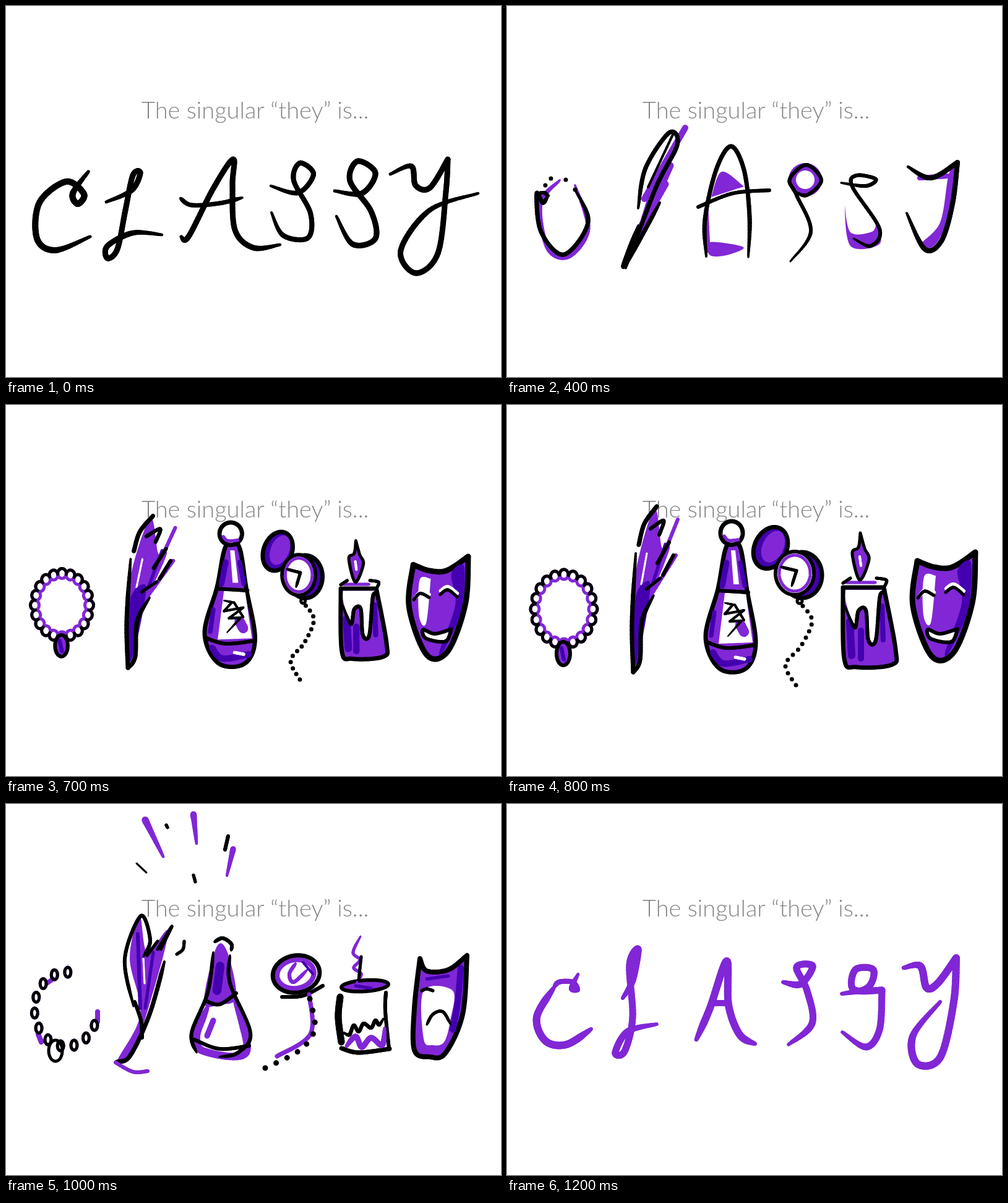
Write an HTML page with a canvas that moves like this. It is 800 px wide and 600 px high and loops after 1300 ms.

```html
<!DOCTYPE html>
<html lang="en">
<head>
<meta charset="utf-8">
<title>Classy</title>
<style>
html, body { margin: 0; width: 100%; height: 100%; overflow: hidden; background: #fff; }
svg, canvas { position: absolute; left: 0; top: 0; width: 800px; height: 600px; }
text { font: 300 38px Lato, "Open Sans", sans-serif; fill: #858585; }
</style>
</head>
<body>
<svg viewBox="0 0 800 600"><text x="219" y="182">The singular “they” is...</text></svg>
<canvas width="800" height="600"></canvas>
<script>
const STEP = 100, COUNT = 13;
const COLORS = { k: '#000', p: '#8127d6', d: '#4400b0', w: '#fff' };
const ctx = document.querySelector('canvas').getContext('2d');
ctx.lineCap = ctx.lineJoin = 'round';

const lerp = (a, b, t) => a + (b - a) * t;

// A bar doubles the point before it, which makes a corner.
function points(text) {
  const out = [];
  text.split('|').forEach((chunk, i) => {
    if (i) out.push(out[out.length - 1]);
    const n = chunk.split(' ').filter(Boolean).map(Number);
    for (let j = 0; j < n.length; j += 2) out.push([n[j], n[j + 1]]);
  });
  return out;
}

// Catmull-Rom curve
function smooth(pts, closed) {
  const n = pts.length, out = [];
  const at = i => closed ? pts[(i + n) % n] : pts[Math.max(0, Math.min(n - 1, i))];
  for (let i = 0; i < (closed ? n : n - 1); i++) {
    const a = at(i - 1), b = at(i), c = at(i + 1), d = at(i + 2);
    if (b[0] === c[0] && b[1] === c[1]) continue;
    for (let j = 0; j < 14; j++) {
      const t = j / 14;
      out.push([0, 1].map(k => b[k] + .5 * t * (c[k] - a[k] +
        t * (2 * a[k] - 5 * b[k] + 4 * c[k] - d[k] + t * (3 * (b[k] - c[k]) + d[k] - a[k])))));
    }
  }
  out.push(closed ? out[0] : pts[n - 1]);
  return out;
}

function resample(pts, count) {
  const q = smooth(pts), len = [0];
  for (let i = 1; i < q.length; i++) {
    len.push(len[i - 1] + Math.hypot(q[i][0] - q[i - 1][0], q[i][1] - q[i - 1][1]));
  }
  let j = 1;
  return Array.from({ length: count }, (_, i) => {
    const d = len[len.length - 1] * i / (count - 1);
    while (j < q.length - 1 && len[j] < d) j++;
    const t = (d - len[j - 1]) / (len[j] - len[j - 1] || 1);
    return [lerp(q[j - 1][0], q[j][0], t), lerp(q[j - 1][1], q[j][1], t)];
  });
}

// Parts of a drawing
const line = (color, width, text, fade) => ({ kind: 'line', color, width, fade, pts: points(text) });
const pen = (width, text, fade) => line('k', width, text, fade);
const brush = (width, text, fade) => line('p', width, text, fade);
const outlined = (color, pts, border) => [
  { kind: 'fill', color, pts },
  ...(border ? [{ kind: 'loop', color: 'k', width: border, pts }] : [])
];
const area = (color, text, border) => outlined(color, points(text), border);
function round(x, y, rx, ry, deg = 0) {
  const r = deg * Math.PI / 180;
  return Array.from({ length: 16 }, (_, i) => {
    const a = i * Math.PI / 8, u = rx * Math.cos(a), v = ry * Math.sin(a);
    return [x + u * Math.cos(r) - v * Math.sin(r), y + u * Math.sin(r) + v * Math.cos(r)];
  });
}
const disc = (color, border, ...oval) => outlined(color, round(...oval), border);
const ring = (color, width, ...oval) => ({ kind: 'loop', color, width, pts: round(...oval) });
const dots = (color, width, text, count) => {
  const pts = points(text);
  return { kind: 'dots', color, width, pts: count ? resample(pts, count) : pts };
};
const beads = (x, y, rx, ry, count, size, span, from = 0, to = 2 * Math.PI) => ({
  kind: 'beads', size, span, center: [x, y],
  pts: Array.from({ length: count }, (_, i) => {
    const a = lerp(from, to, i / count);
    return [x + rx * Math.cos(a), y + ry * Math.sin(a)];
  })
});

const inkC = [pen(10, '133 268 108 303 116 320 126 304 97 284 54 318 50 376 80 395 136 373')];
const inkL = [pen(9, '162 317 203 298 217 270 205 274 193 330 180 393 164 408 164 388 205 367 252 370')];
const inkA = [
  pen(9, '283 373 295 373 335 295 367 248 366 290 370 362 400 391 443 386'),
  pen(7, '282 311 300 322 345 319 382 310')
];
const inkS = [pen(8, '428 291 472 302 497 272 475 254 465 282 492 335 488 375 448 371 429 334')];
const inkZ = [pen(9, '531 299 575 303 597 270 568 251 556 283 590 332 597 376 560 385 534 340')];
const inkY = [pen(9, '621 272 655 259 662 290 685 294 714 248 | 711 300 698 400 662 432 638 395 685 330 763 303')];

const thinC = [pen(9, '96 268 85 300 97 319 102 297 66 300 51 350 66 395 100 405 128 362')];
const thinL = [pen(8, '187 314 222 284 243 245 225 256 212 315 200 390 180 411 182 385 220 357 266 338')];
const thinA = [
  pen(8, '302 398 318 382 340 300 369 248 378 300 382 345 393 375'),
  pen(7, '313 308 325 315 365 303 411 304')
];
const thinS = [pen(8, '446 291 478 304 508 280 484 263 474 302 490 345 480 387 446 395')];
const thinZ = [pen(8, '535 287 575 292 598 270 568 260 560 305 594 358 583 391 545 388')];
const thinY = [pen(8, '622 270 655 268 668 299 690 288 720 250 | 721 310 707 395 667 407 655 375 680 331 715 307')];

const violetC = [
  brush(8, '115 275 104 298 114 300 106 288 84 288 75 298'),
  brush(12, '75 298 48 345 62 383 96 389 136 364')
];
const violetL = [brush(11, '187 314 203 285 212 235 198 260 203 345 190 400 175 402 195 368 242 356')];
const violetA = [brush(12, '306 381 328 330 355 254 358 325 376 373 401 388'), brush(10, '330 322 354 322')];
const violetS = [brush(11, '446 288 475 291 494 262 468 264 485 302 493 355 455 389')];
const violetZ = [brush(11, '541 307 583 297 592 268 563 268 560 300 606 301 | 602 365 580 393 542 369')];
const violetY = [brush(12, '641 265 668 262 678 297 696 290 726 249 | 722 320 700 410 663 420 656 375 700 320')];

const halfNecklace = [
  brush(7, '85 282 54 320 66 392 100 405 131 360 110 290'),
  pen(7, '66 307 58 318 48 304 55 365 92 402 131 350 110 297'),
  pen(6, '49 304 60 302 66 307'),
  dots('k', 7, '62 290 71 279 95 281 110 297')
];
const halfFeather = [
  brush(10, '288 197 222 312'), brush(11, '264 258 213 372'),
  brush(11, '256 288 208 372'), brush(10, '240 285 220 350'),
  pen(7, '212 327 224 262 262 205 275 225 240 295 192 424'),
  pen(4, '268 208 228 293'),
  pen(7, '247 318 205 395 188 420 212 355')
];
const halfBottle = [
  area('p', '347 268 383 292 | 330 309 |'), brush(7, '322 330 325 395'),
  area('p', '327 382 382 390 355 403 328 403'),
  pen(7, '322 405 320 345 338 265 362 227 383 265 392 340 390 406'),
  pen(6, '309 325 365 303 424 298')
];
const halfWatch = [
  ring('p', 12, 482, 281, 21, 21),
  pen(6, '462 298 484 306 508 282 484 257 457 280 468 306 491 365 458 413')
];
const halfCandle = [
  area('p', '546 322 555 366 590 365 598 350 602 385 555 388'),
  pen(6, '540 286 580 291 596 280 565 274 558 292 602 360 588 388 560 376')
];
const halfMask = [
  area('p', '727 262 712 345 690 388 668 386 700 350 714 272'),
  brush(8, '667 278 712 275'),
  pen(8, '648 260 685 278 728 253 | 720 320 702 380 675 393 646 335')
];

const roughNecklace = [brush(4, '60 300 90 271 127 305'), beads(89, 334, 41, 60, 14, [7, 9], 1.5)];
const roughFeather = [
  area('p', '203 370 210 320 268 208 252 258 270 256 212 365'),
  pen(7, '271 195 220 255 202 345 188 418 | 205 375 222 345'),
  pen(5, '262 222 240 290 218 318')
];
const roughBottle = [
  brush(9, '352 228 350 200 366 200 366 226'), pen(6, '345 226 341 205 350 192'),
  area('p', '347 232 370 232 374 265 388 294 | 335 294 | 348 265'),
  brush(13, '337 302 334 374'),
  area('p', '332 385 382 378 378 398 348 408'),
  pen(8, '347 235 335 293 321 350 348 410'), pen(8, '371 232 390 295 403 345 388 406'),
  pen(6, '335 295 388 296'), pen(6, '327 377 355 382 385 377')
];
const roughWatch = [
  disc('d', 7, 457, 239, 22, 28, 35), disc('p', 0, 457, 239, 12, 18, 35),
  disc('d', 7, 487, 282, 27, 27), disc('w', 5, 482, 275, 26, 25), ring('p', 4, 482, 275, 21, 21),
  brush(4, '474 259 480 280 | 495 268'),
  pen(5, '461 312 492 365 465 415 432 435')
];
const roughCandle = [
  area('p', '540 290 558 330 566 342 572 310 601 314 | 602 397 | 544 395 |'),
  pen(8, '540 287 543 375 550 397 600 395 | 598 318'),
  pen(7, '540 287 558 314 566 338 571 308 592 308'),
  ring('k', 5, 570, 272, 31, 8, -3),
  brush(9, '572 234 564 250 567 273'), pen(4, '571 232 561 258'), dots('d', 5, '592 368')
];
const roughMask = [
  area('p', '655 262 | 685 272 715 267 737 252 | 718 360 680 402 647 340', 9),
  area('w', '668 278 702 287 | 692 355 | 658 347'),
  line('w', 6, '655 350 680 369 712 352'), line('w', 5, '690 298 703 295'),
  pen(4, '693 305 705 302 716 310'), pen(4, '672 370 690 372 710 360')
];

const necklace = [
  beads(92, 330, 47, 56, 20, [7, 8], 1.7),
  disc('p', 6, 91, 402, 11, 19), line('d', 6, '88 393 92 412')
];
const feather = [
  area('p', '205 360 208 270 238 168 250 230 262 235 215 350'),
  brush(6, '276 185 222 320'), brush(6, '273 243 225 320'), line('w', 3, '226 240 217 290'),
  area('d', '205 410 208 310 230 285 228 325 212 410'), line('d', 5, '235 290 256 225'),
  pen(7, '208 240 202 350 204 432 | 215 412 218 350 237 308'),
  pen(7, '213 226 222 192 242 164'), pen(6, '232 200 253 187 246 210'),
  pen(6, '262 222 243 256'), pen(6, '269 243 252 275'), pen(5, '248 280 225 298')
];
const bottle = [
  area('p', '355 228 341 297 321 375 343 426 385 427 402 385 388 300 376 228', 7),
  line('d', 9, '355 255 348 292'), line('d', 7, '377 255 384 292'),
  line('d', 10, '333 400 350 418 392 411'), line('d', 7, '335 335 330 373'),
  area('w', '362 235 | 369 235 | 375 290 | 366 290 |'),
  area('w', '352 304 | 386 304 | 397 384 | 342 386 |'),
  line('w', 5, '369 408 384 411'),
  disc('w', 7, 363, 207, 18, 19), brush(5, '351 212 358 219 374 218'),
  pen(6, '341 300 390 303'), pen(6, '322 383 355 393 402 388'),
  brush(16, '377 355 383 367'),
  pen(4, '352 320 365 323 | 352 338 | 383 332 | 360 350 | 379 349 | 357 374'), pen(4, '368 323 383 348')
];
const watch = [
  disc('d', 7, 426, 231, 26, 35, 25), disc('p', 0, 430, 229, 17, 27, 25),
  disc('d', 7, 477, 275, 32, 37), disc('w', 6, 465, 272, 31, 35), ring('p', 5, 465, 272, 25, 29),
  pen(5, '443 262 468 268 | 460 293'), ring('k', 5, 473, 317, 4, 4),
  dots('k', 7, '478 325 493 350 475 390 450 420 467 453', 14)
];
const candle = [
  area('p', '543 295 | 609 295 | 628 395 622 420 565 424 545 410', 7),
  line('d', 12, '554 350 557 405'), line('d', 10, '572 365 572 410'), line('d', 8, '606 325 608 380'),
  area('w', '547 299 | 606 299 | 602 320 596 380 584 378 580 332 568 335 562 358 548 320'),
  pen(6, '546 325 562 360 568 333 580 332 584 380 596 380 603 308 614 310'),
  brush(5, '548 287 595 287'), pen(5, '543 288 555 280'), pen(5, '597 280 613 283 611 292'),
  area('p', '570 283 558 240 568 230 571 207 | 578 232 585 250', 5),
  line('w', 4, '570 245 572 260')
];
const mask = [
  area('p', '663 252 | 690 262 720 262 757 238 | 752 320 722 400 686 406 656 325', 9),
  area('d', '728 268 750 255 745 330 718 394 708 400 735 320'),
  area('w', '674 278 693 276 | 685 352 673 340'),
  line('w', 6, '667 308 678 297 690 303'), line('w', 6, '710 297 722 290 738 301'),
  pen(5, '664 312 675 301 690 308'), pen(5, '709 303 722 295 738 307'),
  area('w', '680 363 700 370 728 362 | 718 383 685 378', 6)
];

const looseNecklace = [
  brush(7, '76 283 66 290'), brush(8, '148 336 148 352'), brush(8, '52 372 57 385'),
  beads(97, 332, 51, 60, 11, [5, 8], 2.9, .45, 5.2),
  ring('k', 5, 80, 399, 11, 17)
];
const looseFeather = [
  area('p', '200 250 216 182 228 240 262 205 236 310 205 400 180 415 217 340'),
  line('d', 6, '213 210 217 330'), line('d', 5, '238 240 225 330'), line('w', 3, '222 250 224 290'),
  pen(6, '206 327 192 250 218 181 233 220 222 247'), pen(5, '228 245 245 222'),
  pen(5, '245 235 268 198 250 235'), pen(7, '256 255 232 340 200 408 178 416'),
  pen(6, '208 320 218 350 220 378'), pen(5, '276 243 286 235 288 222'),
  brush(6, '177 418 205 433 229 432')
];
const flask = [
  area('p', '340 232 358 240 372 312 346 324 320 320'), line('d', 14, '346 262 341 302'),
  brush(12, '325 330 308 375 320 400 388 402 370 318'), brush(9, '335 350 325 375'),
  pen(6, '337 223 350 217 364 226 364 237'), pen(6, '335 240 326 305 300 370 308 402'),
  pen(6, '362 245 362 290 395 370 375 402 345 409'),
  pen(6, '322 318 345 324 372 306'), pen(6, '304 381 345 396 393 391')
];
const looseWatch = [
  ring('p', 8, 468, 275, 30, 23, -10), brush(6, '468 258 458 275 465 288 487 268'),
  line('d', 4, '480 256 496 275'), ring('k', 7, 469, 275, 38, 30, -10),
  pen(6, '446 312 480 310 512 294'), brush(7, '490 308 492 372 438 408'),
  dots('k', 9, '491 315 499 363 475 398 419 427', 9)
];
const looseCandle = [
  disc('p', 6, 580, 294, 38, 9, -4), line('d', 5, '565 294 590 298'),
  pen(11, '540 312 537 345 542 385'), pen(7, '542 395 570 402 620 396'),
  pen(6, '614 305 613 335 619 396'),
  brush(9, '550 392 565 376 575 393 590 378 608 390 612 362'),
  pen(6, '546 370 555 373 562 358 570 368 578 355 590 362 597 350 603 357 610 347'),
  brush(5, '573 214 561 240 572 252 562 265 574 275 566 290'), pen(5, '574 247 570 285')
];
const looseMask = [
  area('p', '669 250 | 680 270 715 268 745 245 | 738 340 710 403 685 409 660 398 660 330', 8),
  line('d', 10, '735 265 730 320 722 365'), line('d', 5, '680 283 715 278'),
  area('w', '675 302 722 302 718 350 708 385 690 390 675 380'),
  pen(5, '680 357 690 340 706 336 719 357'), pen(5, '672 302 680 299 690 302')
];
const sparks = [
  brush(12, '225 26 254 85', true), brush(11, '303 17 308 64', true), brush(10, '367 73 357 116', true),
  pen(5, '259 34 261 38'), pen(6, '354 74 359 52'), pen(3, '211 96 227 111'), pen(5, '303 115 306 126')
];

// Halfway between the pen lines of two drawings.
function blend(from, to) {
  const lines = parts => parts.filter(p => p.color === 'k' && p.kind === 'line');
  return from.map((letter, i) => {
    const goal = lines(to[i]);
    return lines(letter).slice(0, goal.length).map((part, j) => {
      const b = resample(goal[j].pts, 40);
      const pts = resample(part.pts, 40).map((p, k) => [lerp(p[0], b[k][0], .5), lerp(p[1], b[k][1], .5)]);
      return { ...part, pts };
    });
  });
}

function bounds(letter) {
  const all = letter.flatMap(p => p.pts);
  return [0, 1].map(k => {
    const v = all.map(p => p[k]);
    return [Math.min(...v), Math.max(...v)];
  });
}

// A drawing moved halfway towards the place and size of its neighbour.
function lean(drawing, other) {
  return drawing.slice(0, 6).map((letter, i) => {
    const a = bounds(letter), b = bounds(other[i]);
    const move = p => [0, 1].map(k => {
      const t = (p[k] - a[k][0]) / (a[k][1] - a[k][0]);
      return lerp(p[k], lerp(b[k][0], b[k][1], t), .5);
    });
    return letter.map(part => ({
      ...part, pts: part.pts.map(move), center: part.center && move(part.center)
    }));
  });
}

function drawBeads({ size, span, center, pts }) {
  for (const [x, y] of pts) {
    const a = Math.atan2(y - center[1], x - center[0]);
    for (const [color, reach] of [['p', Math.PI], ['k', span]]) {
      ctx.beginPath();
      ctx.ellipse(x, y, ...size, 0, a - reach, a + reach);
      ctx.strokeStyle = COLORS[color];
      ctx.lineWidth = 5;
      ctx.stroke();
    }
  }
}

function drawLine({ width, fade, pts }) {
  const q = smooth(pts), n = q.length - 1;
  for (let i = 1; i <= n; i++) {
    const u = i / n, tip = pts.length > 3 ? Math.min(1, .5 + 4 * Math.min(u, 1 - u)) : 1;
    ctx.lineWidth = width * (fade ? 1 - .6 * u : tip);
    ctx.beginPath();
    ctx.moveTo(...q[i - 1]);
    ctx.lineTo(...q[i]);
    ctx.stroke();
  }
}

function drawPart(part) {
  const { kind, color, width, pts } = part;
  if (kind === 'beads') return drawBeads(part);
  ctx.fillStyle = ctx.strokeStyle = COLORS[color];
  if (kind === 'line') return drawLine(part);
  ctx.beginPath();
  if (kind === 'dots') {
    for (const [x, y] of pts) {
      ctx.moveTo(x, y);
      ctx.arc(x, y, width / 2, 0, 2 * Math.PI);
    }
    return ctx.fill();
  }
  smooth(pts, true).forEach(p => ctx.lineTo(...p));
  ctx.closePath();
  if (kind === 'fill') return ctx.fill();
  ctx.lineWidth = width;
  ctx.stroke();
}

const scene = (...letters) => letters.map(letter => letter.flat());
const ink = scene(inkC, inkL, inkA, inkS, inkZ, inkY);
const thin = scene(thinC, thinL, thinA, thinS, thinZ, thinY);
const half = scene(halfNecklace, halfFeather, halfBottle, halfWatch, halfCandle, halfMask);
const rough = scene(roughNecklace, roughFeather, roughBottle, roughWatch, roughCandle, roughMask);
const full = scene(necklace, feather, bottle, watch, candle, mask);
const loose = scene(looseNecklace, looseFeather, flask, looseWatch, looseCandle, looseMask, sparks);
const violet = scene(violetC, violetL, violetA, violetS, violetZ, violetY);
const poses = [
  ink, blend(ink, thin), thin, blend(thin, half), half, lean(rough, half), rough,
  lean(full, rough), full, lean(loose, full), loose, lean(violet, loose), violet
];

let shown = -1;
function tick() {
  const step = Math.floor(performance.now() / STEP) % COUNT;
  if (step !== shown) {
    shown = step;
    ctx.clearRect(0, 0, 800, 600);
    poses[step].flat().forEach(drawPart);
  }
  requestAnimationFrame(tick);
}
tick();
</script>
</body>
</html>
```
